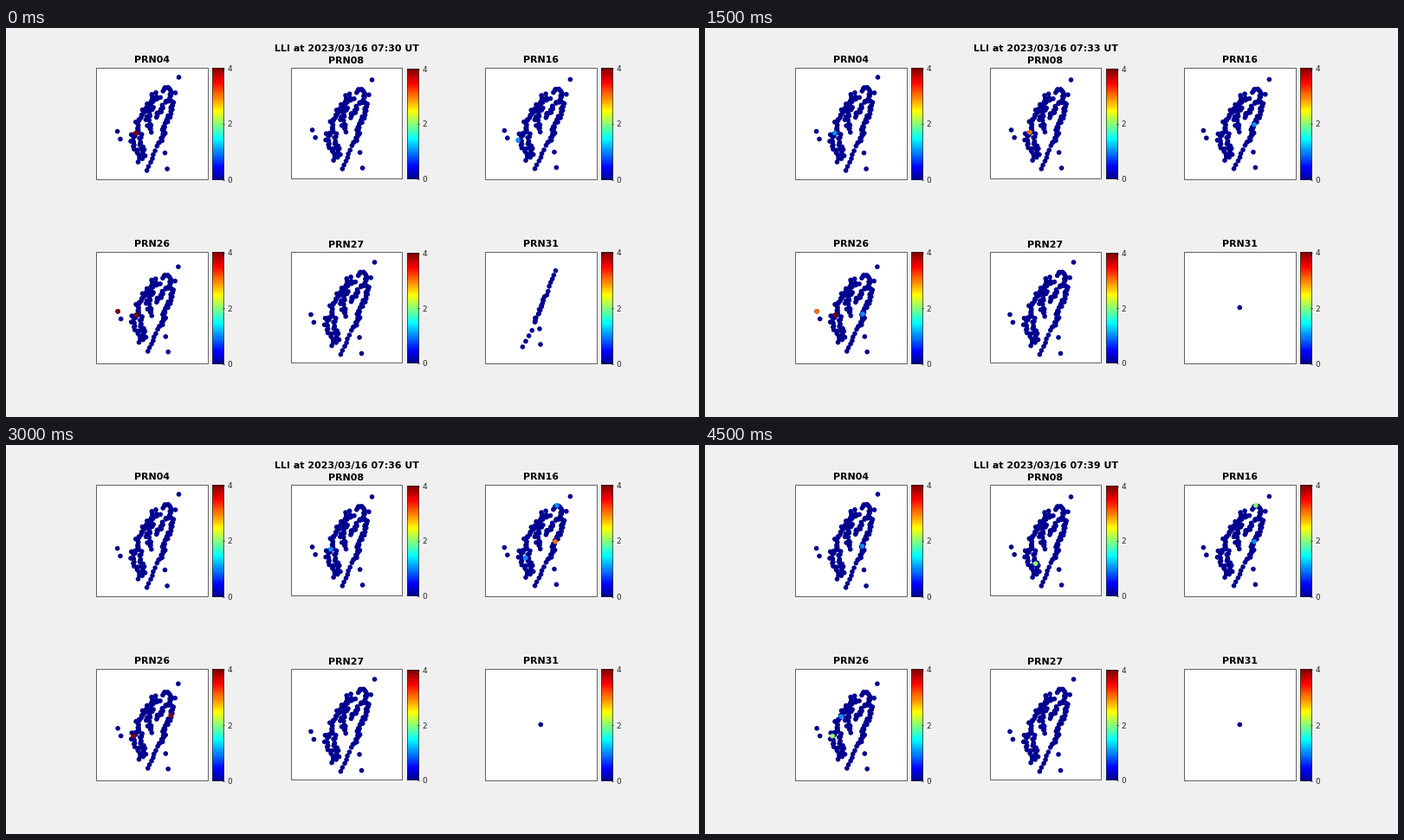
Write a matplotlib script that moves like this. It is 800 px wide and 450 px high and loops after 5 s.

```python
import numpy as np
import matplotlib.pyplot as plt
from matplotlib.animation import FuncAnimation
from matplotlib.patches import Rectangle

W, H, DPI = 800, 450, 100
PX = 72 / DPI                 # points per pixel
FRAMES, STEP = 10, 500
INK = (0.15, 0.15, 0.15)
rng = np.random.default_rng(7)

# Rainbow scale of 64 steps, dark blue to dark red
level = (np.arange(64) + 1) / 64
JET = np.clip([1.5 - abs(4 * level - peak) for peak in (3, 2, 1)], 0, 1).T


def color(value):
    return JET[min(value * 16, 63)]


def chain(points, count, spread):
    """Evenly spaced, slightly scattered dots along a polyline."""
    p = np.array(points, float)
    dist = np.r_[0, np.cumsum(np.hypot(*np.diff(p, axis=0).T))]
    t = np.linspace(0, dist[-1], count)
    line = np.c_[np.interp(t, dist, p[:, 0]), np.interp(t, dist, p[:, 1])]
    return line + rng.uniform(-spread, spread, (count, 2))


# Island stations in the coordinates of the first panel
ANCHORS = [(199.5, 57), (128.6, 119.6), (186.1, 163)]
ISLAND = np.vstack([
    ANCHORS,
    [(195.5, 75), (132, 128.5), (183.5, 144.5), (144, 131), (152.5, 155)],
    chain([(181, 72), (185, 68), (190, 71), (190, 83)], 14, 1.2),
    chain([(193, 86), (189, 85), (181, 88), (180, 95), (172, 103)], 16, 1.8),
    chain([(192, 89), (189, 99), (184, 111), (182, 121), (178, 132)], 28, 1.9),
    chain([(174, 137), (169.5, 149), (163, 165)], 7, 0.6),
    chain([(176, 80), (168, 84), (160, 95), (152, 109), (150, 116)], 27, 2.5),
    chain([(171, 77), (168, 92), (163, 104), (167, 120)], 22, 2.4),
    chain([(151, 120), (146, 125), (149, 139), (157, 152)], 16, 2),
    chain([(154, 118), (156, 133), (160, 148)], 16, 2.3),
])
STREAK = np.vstack([
    [(616, 348), (617, 366)],
    chain([(634, 280.5), (629, 292), (624, 309)], 7, 0.8),
    chain([(622, 311), (616, 326), (610, 341)], 14, 1.2),
    chain([(607, 350), (596.5, 369)], 4, 0.3),
])
TRIO = np.array([(616.3, 309.4), (617.6, 321.5), (618.2, 339.6)])
LAST = np.array([(617.3, 323.4)])

# Where the three anchor stations lie in each panel
PANELS = {
    "PRN04": ANCHORS,
    "PRN08": [(422.5, 60), (353.6, 118), (411.6, 162)],
    "PRN16": [(651.4, 59.5), (575.4, 118.6), (635.4, 161.4)],
    "PRN26": [(198.9, 276.2), (129.1, 327.8), (187.2, 374.7)],
    "PRN27": [(425.5, 271), (352, 331.5), (410.5, 376.5)],
    "PRN31": None,
}

SITES = {
    "isle": ANCHORS[1], "north": (185, 68), "hill": (163.5, 89.5),
    "ridge": (157, 102), "harbour": (190.5, 97), "bay": (184, 111.5),
    "east": (181.5, 117), "west": (150, 121.5), "shore": (146.5, 127),
    "cape": (143.8, 131), "plain": (152, 131.5), "south": (156.5, 138.5),
}
# Flag level of a site in each minute
FLAGS = {
    "PRN04": {"west": "4111...1..", "east": ".........1"},
    "PRN08": {"west": "...3..1...", "south": ".........2"},
    "PRN16": {"cape": "1.........", "bay": "...1..32.1",
              "plain": "....1111..", "north": "......1..2"},
    "PRN26": {"isle": "4.432.....", "west": "4444......",
              "east": ".1111.....", "hill": "....1.....",
              "harbour": "......4...", "shore": "......4..2",
              "south": ".......2..", "ridge": ".........1"},
}


def place(points, name):
    """Carry first-panel points over to another panel."""
    base = np.linalg.inv(np.c_[ANCHORS, np.ones(3)])
    return np.c_[points, np.ones(len(points))] @ base @ np.array(PANELS[name])


plt.rcParams["font.family"] = "DejaVu Sans"
fig = plt.figure(figsize=(W / DPI, H / DPI), dpi=DPI, facecolor="#f0f0f0")
ax = fig.add_axes([0, 0, 1, 1])
ax.axis("off")


def label(x, y, text, size=11, **kw):
    return ax.text(x, y, text, fontsize=size * PX, **kw)


def heading(x, y, text):
    return label(x, y, text, weight="bold", ha="center", va="baseline")


def frame_box(x, y, w, h, fill):
    ax.add_patch(Rectangle((x, y), w, h, fc=fill, ec=INK, lw=0.7 * PX,
                           snap=False, zorder=1))


def color_bar(x, y, h):
    ax.imshow(JET[::-1][:, None], aspect="auto", interpolation="nearest",
              extent=(x - 0.5, x + 13.5, y + h + 0.5, y - 0.5), zorder=0)
    frame_box(x, y, 13, h, "none")
    for value in (0, 2, 4):
        ty = y + h * (1 - value / 4)
        ax.plot([x + 11.5, x + 13], [ty, ty], color=INK, lw=0.6 * PX)
        label(x + 17, ty, str(value), 9, color=INK, va="center_baseline")


for k, name in enumerate(PANELS):
    row, col = divmod(k, 3)
    mid = col == 1            # the middle column is a pixel smaller
    x, y, size = 104.5 + 224.5 * col + mid / 2, 46.5 + 213 * row, 129 - mid
    frame_box(x, y, size, size, "white")
    heading(x + size / 2 - 0.7, y - 6.5 + mid, name)
    color_bar(x + size + (5 if not mid else 6), y + mid, size - mid)

ax.set_xlim(0, W)
ax.set_ylim(H, 0)
dots = ax.scatter([], [], s=(5.6 * PX) ** 2, linewidths=0, zorder=3)
clock = heading(393.5, 27, "")
MAPS = np.vstack([place(ISLAND, n) for n, a in PANELS.items() if a])


def draw(i):
    lone = STREAK if i == 0 else TRIO if i == 1 else LAST
    spots, shades = [MAPS, lone], [color(0)] * (len(MAPS) + len(lone))
    for name, sites in FLAGS.items():
        for site, levels in sites.items():
            if levels[i] != ".":
                spots.append(place([SITES[site]], name))
                shades.append(color(int(levels[i])))
    dots.set_offsets(np.vstack(spots))
    dots.set_facecolor(shades)
    clock.set_text(f"LLI at 2023/03/16 07:{30 + i} UT")
    return dots, clock


anim = FuncAnimation(fig, draw, frames=FRAMES, interval=STEP,
                     init_func=lambda: draw(0), repeat=True, repeat_delay=0)
plt.show()
```
